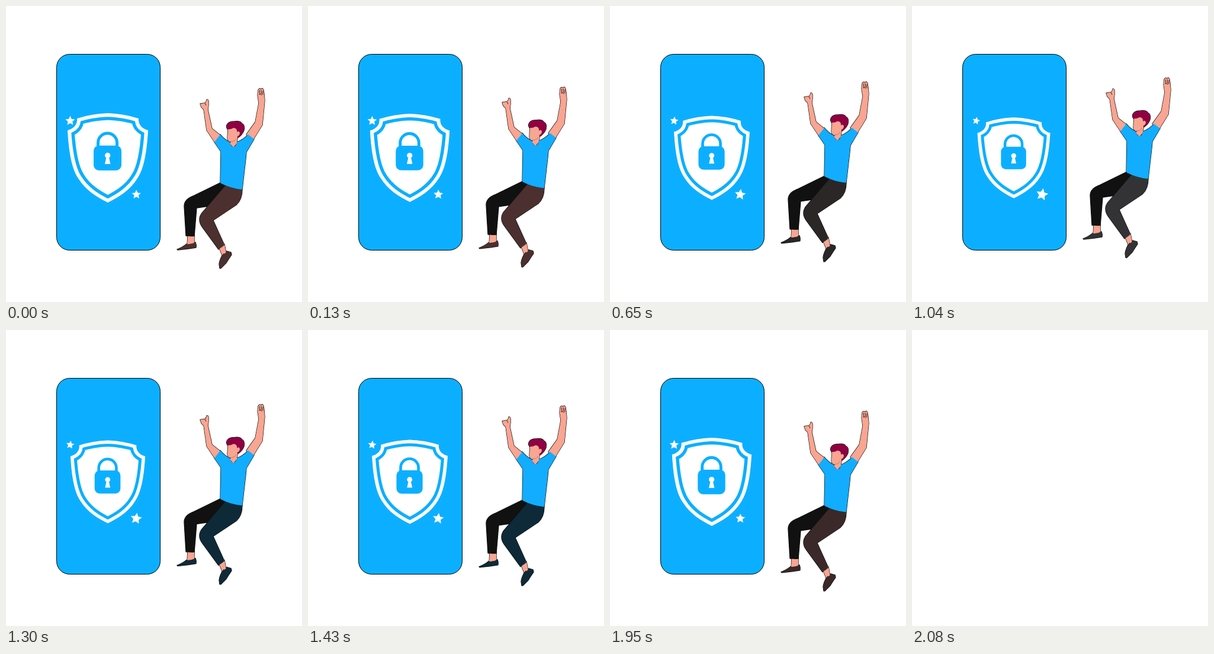
Write an HTML page with a canvas that moves like this. It is 500x500 px and loops after 2210 ms.

```html
<!DOCTYPE html>
<html lang="en">
<head>
<meta charset="utf-8">
<title>Secure phone</title>
<style>
  html, body { margin: 0; width: 100%; height: 100%; overflow: hidden; background: #fff; }
  canvas { display: block; width: 500px; height: 500px; }
</style>
</head>
<body>
<canvas id="stage" width="500" height="500"></canvas>
<script>
const ctx = document.getElementById('stage').getContext('2d');
const STEP = 130, STEPS = 17, PEAK = 8;
const BLUE = '#0cafff', SHIRT = '#12adff', SKIN = '#f8a592', HAIR = '#8f0042', DARK = '#101110';

// The trousers and shoes change tone during the jump: [first step, colour]
const TONES = [[0, '#4b302f'], [2, '#2e2e30'], [5, '#2b2727'], [7, '#333335'],
               [10, '#0e2a38'], [12, '#3b2929']];

const shield = new Path2D('M172 181 Q199 182 224 190 C223 201 230 207 240 210 C238 243 234 273 222 291 ' +
  'C209 312 190 323 172 332 C154 323 135 312 122 291 C110 273 106 243 104 210 C114 207 121 201 120 190 Q145 182 172 181Z');

// Body parts from back to front; no colour means the changing tone
const man = [
  ['M328 165 L336 164 Q339 161 339 158 Q341 157 342 161 L342 168 L341 175 L348 207 L363 219 L353 231 L339 210 L334 175 L330 171Z', SKIN],
  ['M425 151 L426 142 Q428 138 431 141 Q433 137 435 142 L436 148 L437 160 L433 201 L417 227 L406 217 L421 196 L427 164Z', SKIN],
  ['M307 386 L318 387 L318 402 L306 404Z', SKIN],
  ['M359 406 L369 402 L372 418 L365 421Z', SKIN],
  ['M289 411 Q298 408 305 402 Q313 403 320 399 Q322 404 321 408 L308 410 L290 412Z'],
  ['M361 443 L360 436 Q361 428 367 418 Q371 419 373 414 L380 416 L381 420 Q376 427 372 434 L363 443Z'],
  ['M363 298 L318 320 Q301 326 301 338 L304 388 Q311 390 318 389 L322 341 L343 338 L374 304Z', DARK],
  ['M371 303 L399 310 Q399 327 389 336 L350 362 L369 404 Q364 408 359 411 L332 374 Q323 362 330 351Z'],
  ['M375 204 L391 204 L391 224 L390 232 L384 239 L378 232 L380 229 Q375 230 374 224Z', SKIN],
  ['M362 217 Q369 226 378 230 Q380 237 384 238 Q389 237 390 230 Q401 226 409 217 L419 225 L406 247 L405 258 L399 310 Q379 308 362 299 L363 246 L352 230Z', SHIRT],
  ['M374 208 C370 201 375 195 386 195 C393 194 397 196 398 198 C403 200 403 205 402 210 Q399 218 391 223 L390 210 Q389 206 384 206 Q379 209 374 208Z', HAIR],
  ['M389 214 Q394 209 395 215 Q394 220 390 220Z', SKIN]
].map(([d, fill]) => ({ path: new Path2D(d), fill }));

const creases = new Path2D('M428 142 L429 149 M431 142 L432 149 M434 143 L434 150 M427 150 Q430 147 432 151 M336 164 L338 168');
const chin = new Path2D('M380 229 Q386 229 389 224');

const shackle = new Path2D('M155.5 239 V231 A16 16 0 0 1 187.5 231 V239');
const keyhole = new Path2D('M169.8 254 H173.6 L176.4 267 H167Z ' +
  'M167 252.5 A4.7 4.7 0 0 1 176.4 252.5 A4.7 4.7 0 0 1 167 252.5Z');

function fill(path, colour) {
  ctx.fillStyle = colour;
  ctx.fill(path);
}

function stroke(path, colour, width) {
  ctx.strokeStyle = colour;
  ctx.lineWidth = width;
  ctx.stroke(path);
}

function box(x, y, w, h, r) {
  const p = new Path2D();
  p.roundRect(x, y, w, h, r);
  return p;
}

function drawPhone() {
  const body = box(85.5, 81.5, 175, 331, 22);
  fill(body, BLUE);
  stroke(body, '#000', 1);
}

function drawShield(scale) {
  ctx.save();
  ctx.translate(172, 256.5);
  ctx.scale(scale, scale);
  ctx.translate(-172, -256.5);

  ctx.save();
  ctx.clip(shield);
  fill(shield, '#fff');
  stroke(shield, BLUE, 23);
  stroke(shield, '#fff', 12);
  ctx.restore();

  fill(box(148, 235.7, 47, 42, 9), BLUE);
  stroke(shackle, BLUE, 5);
  fill(keyhole, '#fff');
  ctx.restore();
}

function drawStar(x, y, radius, turn) {
  const p = new Path2D();
  for (let i = 0; i < 10; i++) {
    const r = i % 2 ? radius * 0.48 : radius;
    const a = turn + i * Math.PI / 5 - Math.PI / 2;
    p.lineTo(x + r * Math.cos(a), y + r * Math.sin(a));
  }
  p.closePath();
  fill(p, '#fff');
}

function drawMan(lift, tone) {
  ctx.save();
  ctx.translate(0, -lift);
  ctx.lineJoin = 'round';
  for (const part of man) stroke(part.path, '#000', 1.3);
  for (const part of man) fill(part.path, part.fill || tone);
  stroke(creases, '#000', 0.8);
  stroke(chin, '#d9705f', 1);
  ctx.restore();
}

function draw(now) {
  const step = Math.floor(now / STEP) % STEPS;
  ctx.fillStyle = '#fff';
  ctx.fillRect(0, 0, 500, 500);
  // The last step of the loop is empty
  if (step < STEPS - 1) {
    const rise = 1 - Math.abs(step - PEAK) / PEAK;
    const tone = TONES.filter(([first]) => first <= step).pop()[1];
    drawPhone();
    drawShield(1 - 0.096 * rise);
    drawStar(108.4, 194, 8.4 - 1.7 * rise, 0.2 * rise);
    drawStar(220.2 - 0.5 * rise, 318.5, 8 + 2.6 * rise, 0.2 * rise);
    drawMan(18 * rise, tone);
  }
}

const start = performance.now();
function tick() {
  draw(performance.now() - start);
  requestAnimationFrame(tick);
}
tick();
</script>
</body>
</html>
```
